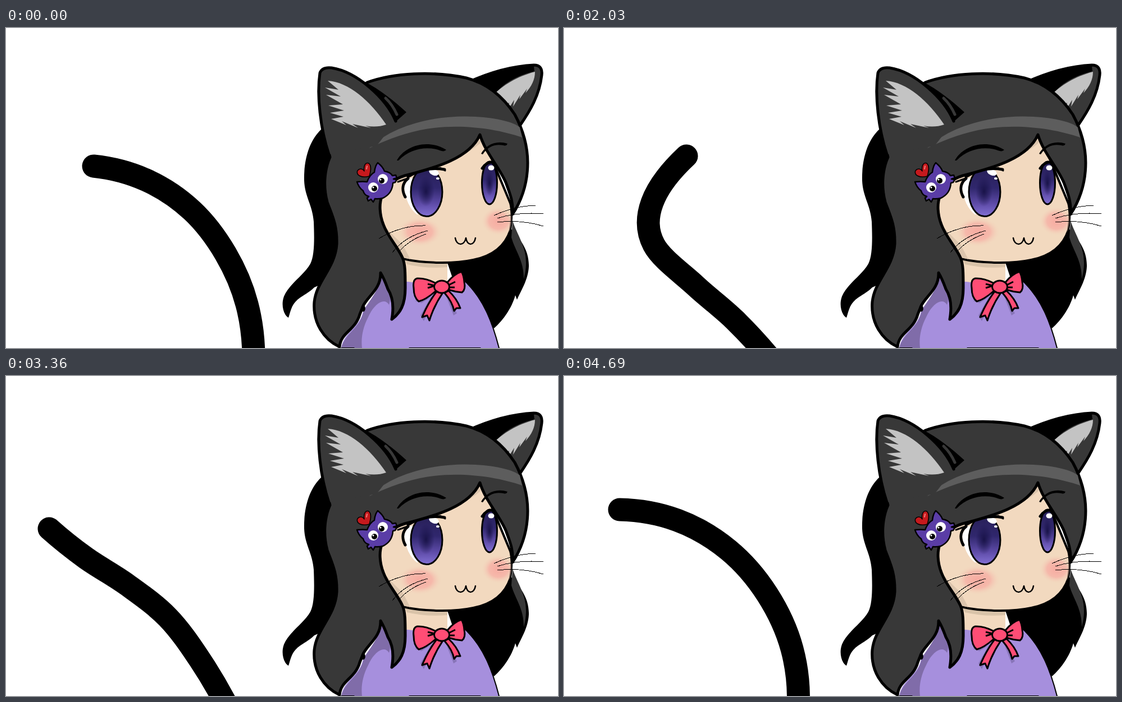
An HTML page for the animation above (4760 ms loop, 983 px wide and 570 px high).

```html
<!DOCTYPE html>
<html lang="en">
<head>
<meta charset="utf-8">
<title>Cat girl</title>
<style>
html, body { margin: 0; width: 100%; height: 100%; overflow: hidden; background: #fff; }
svg { display: block; width: 983px; height: 570px; }
.line { fill: none; stroke: #000; stroke-linecap: round; stroke-linejoin: round; }
.inked { stroke: #000; stroke-linejoin: round; }
.hair { fill: #383838; stroke-width: 5; }
.skin { fill: #f2d9bf; }
.fur { fill: #c3c3c3; }
.bow { fill: #ff4d75; stroke-width: 3; }
.clip { fill: #5a3da6; stroke-width: 2.5; }
</style>
</head>
<body>
<svg viewBox="0 0 983 570">
  <defs>
    <linearGradient id="iris" x1="0" y1="0" x2="0" y2="1">
      <stop offset="0" stop-color="#282058"/>
      <stop offset=".42" stop-color="#30276d"/>
      <stop offset=".75" stop-color="#5f4ca9"/>
      <stop offset="1" stop-color="#8371d4"/>
    </linearGradient>
    <radialGradient id="pupil">
      <stop offset="0" stop-color="#191349"/>
      <stop offset="1" stop-color="#191349" stop-opacity="0"/>
    </radialGradient>
    <radialGradient id="blush">
      <stop offset="0" stop-color="#f7aaa0"/>
      <stop offset=".55" stop-color="#f6b3a7" stop-opacity=".85"/>
      <stop offset="1" stop-color="#f2d9bf" stop-opacity="0"/>
    </radialGradient>
    <path id="face" d="M845 185C780 210 700 250 672 290C664 308 663 335 673 354C682 372 697 388 707 411C745 420 800 420 832 413C866 406 889 388 898 360C900 345 902 325 898 312Z"/>
    <clipPath id="inFace"><use href="#face"/></clipPath>
  </defs>

  <path id="tail" class="line" stroke-width="41"/>

  <!-- back hair -->
  <path d="M562 180C540 200 530 235 531 272C532 300 546 316 548 345C549 372 550 405 542 420C530 441 504 456 495 478C489 494 495 512 503 516C507 504 508 494 519 484C530 475 542 470 549 462L600 440V180Z"/>
  <path d="M785 415L897 355C915 375 932 395 931 425C930 448 917 468 910 484L907 476C901 498 886 520 869 535L800 460Z"/>
  <path fill="#383838" d="M902 343C910 368 926 388 926 418C926 430 924 440 922 447C922 413 907 398 900 373Z"/>

  <!-- neck and shirt -->
  <path class="skin" d="M708 405H786V450L760 470L709 458Z"/>
  <path fill="#d9c3a9" d="M711 414Q750 422 786 420V426Q748 429 714 421Z"/>
  <path fill="#a68fdd" d="M597 570C602 540 630 535 636 504C650 480 668 472 673 440L706 452Q720 451 735 456L815 450C850 483 864 520 878 570Z"/>
  <path class="line" stroke-width="2" d="M822 455C850 485 865 520 878 570"/>
  <path fill="#806ca9" d="M597 570C604 543 630 536 637 504C650 480 664 470 668 438L688 470L682 493C673 478 654 494 645 515C635 534 632 553 634 570Z"/>
  <path class="line" stroke-width="1" d="M597 569.5H620M718 569.5H845"/>
  <path fill="#8875b9" d="M728 486L740 490L768 472L744 522L738 512L756 480ZM784 478L803 508L797 512Z"/>

  <!-- face -->
  <use href="#face" class="skin inked" stroke-width="4"/>
  <g clip-path="url(#inFace)">
    <path fill="#dcc5ad" d="M660 330Q672 355 706 385L720 412L690 405ZM690 273Q790 250 845 205V199L690 262Z"/>
    <ellipse cx="737" cy="363" rx="40" ry="27" fill="url(#blush)"/>
    <ellipse cx="877" cy="344" rx="31" ry="26" fill="url(#blush)"/>
    <path fill="#fff" d="M709 283C711 305 719 323 733 333L735 266L716 268Z"/>
  </g>
  <ellipse class="inked" cx="749" cy="292" rx="28" ry="43.5" fill="url(#iris)" stroke-width="3"/>
  <ellipse cx="748" cy="291" rx="15" ry="27" fill="url(#pupil)"/>
  <ellipse class="inked" cx="861" cy="276" rx="13.5" ry="38" fill="url(#iris)" stroke-width="3"/>
  <ellipse cx="861" cy="276" rx="8" ry="23" fill="url(#pupil)"/>
  <g fill="#fff">
    <ellipse cx="762" cy="257" rx="9" ry="5.5" transform="rotate(22 762 257)"/>
    <ellipse cx="769" cy="268" rx="3" ry="2"/>
    <ellipse cx="864" cy="249" rx="5.5" ry="4.5"/>
  </g>
  <path class="line" stroke-width="5" d="M716 265Q745 246 781 252M716 268C706 276 704 288 711 301M848 250Q857 236 873 239"/>
  <path class="line" stroke-width="3" d="M698 274L715 268M773 249L782 254"/>
  <path class="line" stroke-width="2.5" d="M800 374C802 388 816 389 819 374C821 389 834 388 836 374"/>

  <!-- right ear -->
  <path class="inked hair" d="M822 97C855 82 895 68 940 66Q956 66 954 84C950 120 933 148 915 174L868 118Z"/>
  <path d="M824 96C862 82 895 70 940 68L941 77Q890 90 869 120Z"/>
  <path class="fur" d="M868 119C884 103 910 86 942 78C942 92 936 104 925 116L928 108L914 127L916 119L903 140L905 128L893 147L896 133L885 139L888 131L878 132L884 126Z"/>

  <!-- front hair -->
  <path class="inked hair" d="M568 182C568 200 573 213 577 230C568 250 564 280 572 310C580 332 590 350 589 385C586 428 553 450 549 488C546 525 566 555 594 568C596 542 622 539 630 510L636 495C640 502 634 507 635 497C643 478 668 466 667 436C674 448 676 454 680 465C691 482 690 502 687 519C702 508 711 493 711 463C711 437 711 420 706 409C697 389 680 372 672 350C665 332 664 312 670 298C676 282 690 269 710 263C765 249 826 232 844 190C853 221 878 247 890 275C897 294 904 310 902 332C915 312 929 280 929 240C929 207 920 180 906 154C885 122 858 99 820 89C760 76 690 80 643 97L600 140Z"/>
  <path fill="#5d5d5d" d="M647 214C690 172 768 154 836 158C875 160 905 168 915 177L919 195C870 178 800 169 737 182C700 190 672 202 647 214Z"/>
  <path d="M696 236C709 211 750 196 784 217C779 222 774 218 766 216C743 211 718 217 699 236ZM846 224C854 209 872 199 893 206Q891 211 886 209C871 206 858 211 849 225Z"/>

  <!-- left ear -->
  <path fill="#383838" d="M575 225C560 180 553 120 559 80Q563 69 580 71C625 78 677 125 694 166L660 210Z"/>
  <path class="line" stroke-width="5" d="M575 225C560 180 553 120 559 80Q563 69 580 71C625 78 677 125 694 166"/>
  <path d="M637 95C667 110 691 130 713 150L695 166C683 140 665 116 637 95Z"/>
  <path class="line" stroke="#383838" style="stroke:#383838" stroke-width="5" d="M676 125Q688 136 696 154"/>
  <path class="fur" d="M573 94C610 96 649 130 677 172Q660 178 640 174L650 178L617 171L627 178L598 166L606 173L579 162L601 158L577 151L602 147L574 138L600 136L570 119L596 122L568 106L592 110Z"/>

  <!-- hair clip -->
  <path class="inked clip" d="M625 274Q636 273 643 274Q648 261 656 257Q657 246 662 240Q671 247 674 255Q685 257 688 263L694 262L696 267L690 269L696 270L693 275L689 276Q688 295 671 303Q663 305 657 304L654 310L650 305L645 308L643 303L646 300Q638 298 636 290Q628 284 625 274Z"/>
  <g fill="#fff"><circle cx="654" cy="284" r="9"/><circle cx="671" cy="269" r="9"/></g>
  <circle cx="656" cy="286" r="5"/><circle cx="669" cy="272" r="5"/>
  <g fill="#fff"><circle cx="654" cy="284" r="1.5"/><circle cx="667" cy="270" r="1.5"/></g>
  <path class="inked" fill="#c5191d" stroke-width="1.5" d="M647 264C633 268 623 262 626 254C630 249 636 251 638 255C636 244 641 239 646 241C652 246 649 257 647 264Z"/>
  <path class="line" style="stroke:#f0807c" stroke-width="2" d="M643 246L642 251"/>

  <!-- whiskers -->
  <g class="line" stroke-width="1" shape-rendering="crispEdges">
    <path d="M664 375Q705 351 747 352M688 400Q710 371 751 361M700 398Q719 377 748 367"/>
    <path d="M869 334Q905 317 943 316M875 339Q912 327 957 331M875 346Q918 341 957 353"/>
  </g>

  <!-- bow -->
  <g class="inked bow">
    <path d="M767 469Q751 491 741 515L750 512L754 521Q762 495 777 473Z"/>
    <path d="M781 472Q795 488 798 504L802 499L809 499Q803 482 788 468Z"/>
    <path d="M766 455Q748 445 732 446Q724 448 726 463Q726 480 735 487Q748 484 767 467Z"/>
    <path d="M786 453Q798 438 811 434Q815 440 816 452Q819 466 812 471Q800 470 787 466Z"/>
    <path d="M751 456L764 459L751 463M788 458L800 452M789 462L799 462"/>
    <ellipse cx="776" cy="461" rx="13.5" ry="11"/>
  </g>
</svg>
<script>
const STEP = 70, STEPS = 17, BASE_Y = 592;

// Each pose: step, four inner joints after the tip as x, y, then the base x.
const poses = [
  [0, 156, 246, 250, 271, 331, 325, 391, 402, 429, 492, 441],
  [4, 402, 212, 453, 271, 429, 350, 397, 427, 383, 510, 386],
  [5, 488, 174, 458, 254, 418, 336, 382, 420, 372, 505, 380],
  [6, 537, 179, 450, 238, 390, 320, 360, 412, 357, 502, 374],
  [7, 489, 188, 412, 241, 361, 318, 337, 408, 342, 501, 369],
  [10, 366, 200, 304, 264, 263, 344, 255, 433, 282, 517, 336],
  [12, 218, 228, 157, 311, 160, 386, 234, 459, 304, 520, 370],
  [13, 148, 258, 133, 337, 172, 406, 248, 457, 322, 519, 383],
  [14, 77, 272, 142, 324, 216, 372, 288, 430, 345, 505, 396],
  [15, 77, 251, 164, 288, 250, 336, 326, 409, 378, 494, 407],
  [16, 99, 238, 202, 257, 293, 310, 362, 389, 406, 486, 417]
];
const tail = document.getElementById("tail");

// Pose by index, wrapping round the cycle with its step shifted to match.
function poseAt(i) {
  const n = poses.length, [step, ...values] = poses[(i + n) % n];
  return { step: step + STEPS * Math.floor(i / n), values };
}

function jointsAt(step) {
  const i = poses.findLastIndex(p => p[0] <= step);
  const [a, b, c, d] = [i - 1, i, i + 1, i + 2].map(poseAt);
  const span = c.step - b.step, u = (step - b.step) / span;
  const v = b.values.map((from, k) => {
    const to = c.values[k];
    const m0 = (to - a.values[k]) / (c.step - a.step) * span;
    const m1 = (d.values[k] - from) / (d.step - b.step) * span;
    const w = u * u * (3 - 2 * u);
    return from + (to - from) * w + m0 * u * (1 - u) ** 2 - m1 * u * u * (1 - u);
  });
  v.push(BASE_Y);
  return Array.from({ length: 6 }, (_, k) => [v[2 * k], v[2 * k + 1]]);
}

// Smooth curve through the joints; the end tangents continue the bend.
function curve(points) {
  const beyond = (p, q, r) => p.map((x, k) => 3 * x - 3 * q[k] + r[k]);
  const p = [beyond(...points.slice(0, 3)), ...points, beyond(...points.slice(-3).reverse())];
  let d = "M" + p[1];
  for (let i = 1; i < p.length - 2; i++) {
    const c1 = p[i].map((x, k) => x + (p[i + 1][k] - p[i - 1][k]) / 6);
    const c2 = p[i + 1].map((x, k) => x - (p[i + 2][k] - p[i][k]) / 6);
    d += "C" + [c1, c2, p[i + 1]];
  }
  return d;
}

function draw() {
  const step = Math.floor(performance.now() / STEP) % STEPS;
  tail.setAttribute("d", curve(jointsAt(step)));
  requestAnimationFrame(draw);
}
draw();
</script>
</body>
</html>
```
